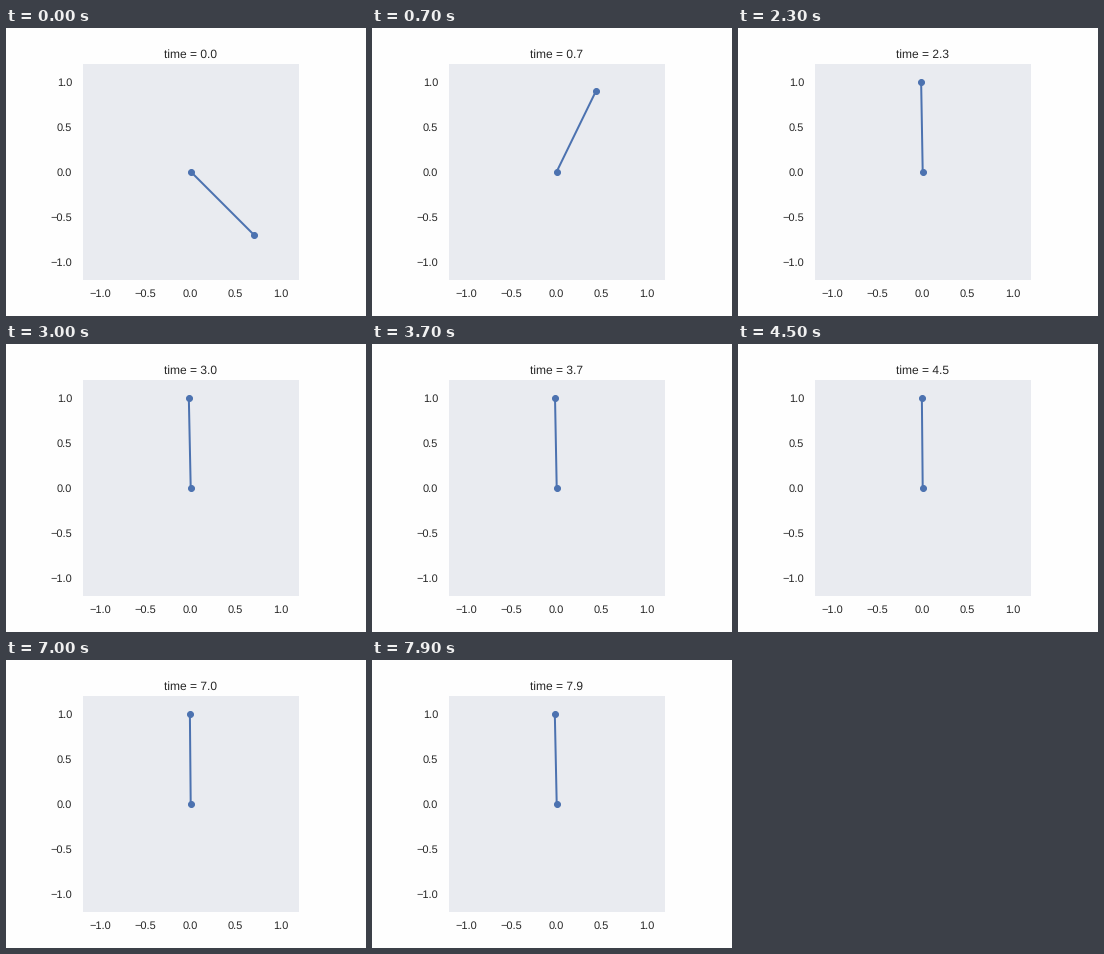
A matplotlib script that plays this animation: 360 px wide and 288 px high, repeating every 8000 ms.

```python
import numpy as np
import matplotlib.pyplot as plt
from matplotlib.animation import FuncAnimation

WIDTH, HEIGHT, DPI = 360, 288, 72
STEP = 0.1       # seconds per frame
FRAMES = 80
START = 0.75 * np.pi
RATE = 4.3       # swing-up speed
LEAN, SWAY, PERIOD = -0.015, 0.006, 4.9 / 8

plt.rcParams.update({
    "font.family": "Liberation Sans",
    "text.hinting": "none",
    "text.color": "0.15",
    "xtick.color": "0.15",
    "ytick.color": "0.15",
})


def angle(t):
    """Lean from upright: damped swing-up, then a small balancing sway."""
    decay = (1 + RATE * t) * np.exp(-RATE * t)
    balance = LEAN - SWAY * np.cos(2 * np.pi * (t - 3) / PERIOD)
    return START * decay + balance * (1 - decay)


fig = plt.figure(figsize=(WIDTH / DPI, HEIGHT / DPI), dpi=DPI,
                 facecolor="#FEFEFE")
ax = fig.add_axes([76.7 / WIDTH, 36.4 / HEIGHT, 216 / WIDTH, 216 / HEIGHT],
                  facecolor="#E9EBF0")
ax.set(xlim=(-1.2, 1.2), ylim=(-1.2, 1.2))
ticks = np.arange(-1, 1.1, 0.5)
ax.set_xticks(ticks)
ax.set_yticks(ticks)
ax.tick_params(length=0, pad=9.5, labelsize=11)
ax.tick_params(axis="y", pad=10.5)
for spine in ax.spines.values():
    spine.set_visible(False)

rod, = ax.plot([], [], "o-", color="#4C72B0", lw=2, ms=6,
               solid_capstyle="round")
title = ax.set_title("", fontsize=12, pad=6)


def draw(frame):
    t = frame * STEP
    phi = angle(t)
    rod.set_data([0, np.sin(phi)], [0, np.cos(phi)])
    title.set_text(f"time = {t:.1f}")
    return rod, title


anim = FuncAnimation(fig, draw, frames=FRAMES, interval=1000 * STEP,
                     repeat=True, repeat_delay=0)
plt.show()
```
